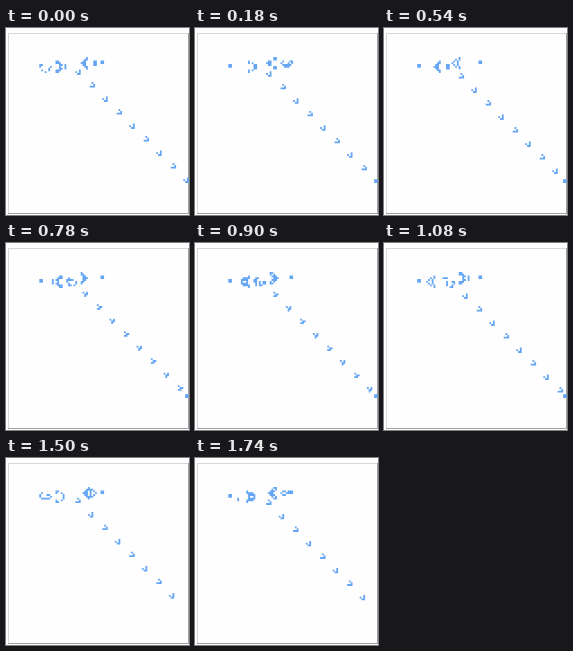
Animation, 183 px wide and 187 px high, one loop 1800 ms. Source, as an HTML page with a canvas:

```html
<!DOCTYPE html>
<html lang="en">
<head>
<meta charset="utf-8">
<title>Glider gun</title>
<style>
  html, body { margin: 0; width: 100%; height: 100%; overflow: hidden; background: #fff; }
  canvas { display: block; width: 183px; height: 187px; }
</style>
</head>
<body>
<canvas id="stage" width="183" height="187"></canvas>
<script>
const SIZE = 100, CELL = 1.8, LEFT = 2.7, TOP = 5.5;
const STEP = 60, FRAMES = 30, WARM_UP = 261;
const GUN_X = 17, GUN_Y = 13;

// Live columns of the glider gun, row by row
const GUN = [
  [24],
  [22, 24],
  [12, 13, 20, 21, 34, 35],
  [11, 15, 20, 21, 34, 35],
  [0, 1, 10, 16, 20, 21],
  [0, 1, 10, 14, 16, 17, 22, 24],
  [10, 16, 24],
  [11, 15],
  [12, 13]
];

// The grid has a dead margin one cell wide on each side
const WIDE = SIZE + 2;
const at = (x, y) => (y + 1) * WIDE + x + 1;
const AROUND = [-WIDE - 1, -WIDE, -WIDE + 1, -1, 1, WIDE - 1, WIDE, WIDE + 1];

function evolve(grid) {
  const next = new Uint8Array(grid.length);
  for (let y = 0; y < SIZE; y++) {
    for (let x = 0; x < SIZE; x++) {
      const i = at(x, y);
      let n = 0;
      for (const d of AROUND) n += grid[i + d];
      next[i] = n === 3 || (n === 2 && grid[i]) ? 1 : 0;
    }
  }
  return next;
}

// Eleven generations pass in every ten frames
const generation = frame => Math.ceil(frame * 11 / 10);

function buildLoop() {
  let grid = new Uint8Array(WIDE * WIDE);
  GUN.forEach((cols, y) => cols.forEach(x => { grid[at(GUN_X + x, GUN_Y + y)] = 1; }));
  for (let i = 0; i < WARM_UP; i++) grid = evolve(grid);
  const states = [grid];
  while (states.length <= generation(FRAMES - 1)) states.push(grid = evolve(grid));
  return states;
}

const ctx = document.getElementById("stage").getContext("2d");

function fill(color, x, y, w, h) {
  ctx.fillStyle = color;
  ctx.fillRect(x, y, w, h);
}

function drawBoard() {
  fill("#fff", 0, 0, 183, 187);
  fill("#d8d8d8", 2, 5, 181, 181);
  fill("#a0a0a0", 182, 5, 1, 181);
  fill("#a0a0a0", 2, 185, 181, 1);
  fill("#fefefe", 3, 6, 179, 179);
}

function draw(grid) {
  drawBoard();
  ctx.beginPath();
  for (let y = 0; y < SIZE; y++) {
    for (let x = 0; x < SIZE; x++) {
      if (grid[at(x, y)]) ctx.rect(LEFT + x * CELL, TOP + y * CELL, CELL, CELL);
    }
  }
  ctx.fillStyle = "#64a5f4";
  ctx.fill();
}

const states = buildLoop();
const start = performance.now();
let shown = -1;

function tick() {
  const frame = Math.floor((performance.now() - start) / STEP) % FRAMES;
  if (frame !== shown) draw(states[generation(shown = frame)]);
  requestAnimationFrame(tick);
}
tick();
</script>
</body>
</html>
```
